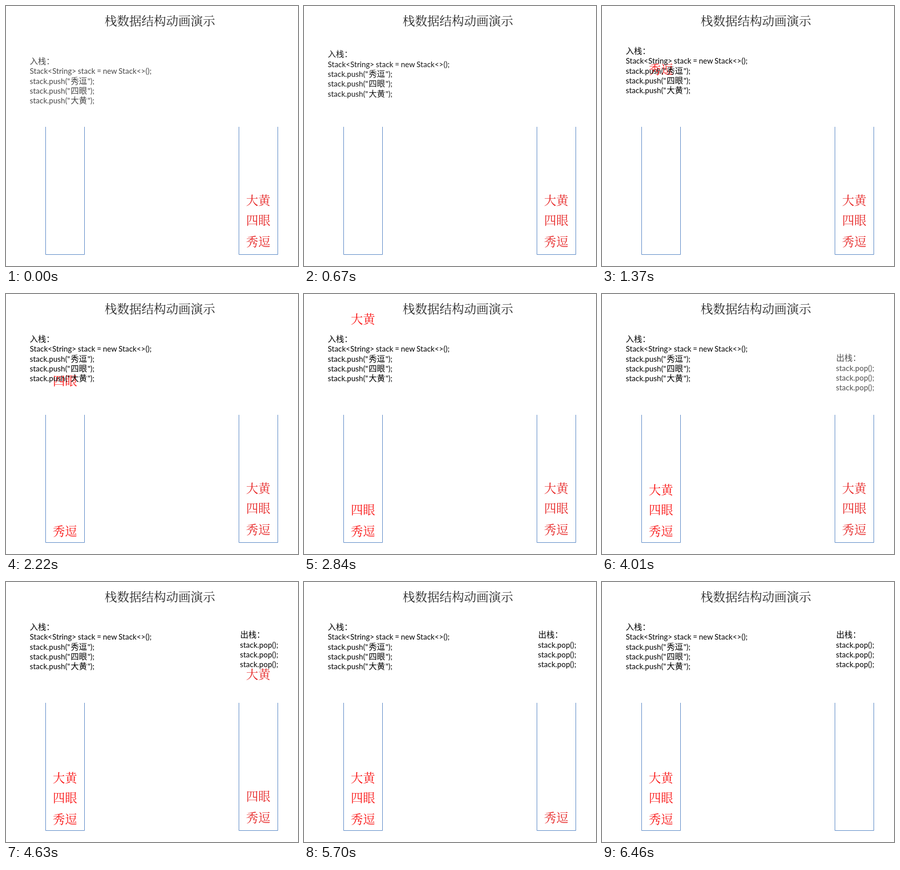
Write an HTML page that moves like this. It is 571x510 px and loops after 6.94 s.

```html
<!DOCTYPE html>
<html lang="zh-CN">
<head>
<meta charset="utf-8">
<style>
  html, body { margin: 0; width: 100%; height: 100%; overflow: hidden; background: #fff; }
  svg { display: block; }
  text { white-space: pre; }
  .big { font: 300 23.8px "Noto Serif CJK SC", "Noto Sans CJK SC", "Noto Sans CJK", serif; }
  .code { font: 14.8px Lato, "Noto Sans CJK SC", "Noto Sans CJK", sans-serif; letter-spacing: .08px; word-spacing: -.8px; }
  .cjk { font: 300 16px "Noto Sans CJK SC", "Noto Sans CJK", sans-serif; letter-spacing: 0; }
</style>
</head>
<body>
<svg id="stage" width="571" height="510" viewBox="0 0 571 510">
  <text class="big" x="193" y="38" fill="#262626" style="font-size:24px">栈数据结构动画演示</text>
  <path d="M77.5 237V487.5H153.5V237M455.5 237V487.5H531.5V237" fill="none" stroke="#5585c4"/>
  <g id="items"></g>
  <g id="push" class="code">
    <text class="cjk" x="46.5" y="94">入栈：</text>
    <text x="46.5" y="113.3">Stack&lt;String&gt; stack = new Stack&lt;&gt;();</text>
  </g>
  <g id="pop" class="code">
    <text class="cjk" x="458" y="109">出栈：</text>
  </g>
</svg>
<script>
const LOOP = 6940, TICK = 76.9, FLIGHT = 620, OFFSCREEN = -20;
const $ = id => document.getElementById(id);

function addText(parent, x, y, html, attrs = {}) {
  const el = document.createElementNS("http://www.w3.org/2000/svg", "text");
  for (const [key, value] of Object.entries({ x, y, ...attrs })) el.setAttribute(key, value);
  el.innerHTML = html;
  parent.append(el);
  return el;
}

// Centre heights in each stack, then the start of the push and of the pop
const items = [
  { name: "秀逗", left: 465, right: 461.5, pushAt: 1200, popAt: 5814 },
  { name: "四眼", left: 423, right: 420, pushAt: 1964, popAt: 5078 },
  { name: "大黄", left: 384, right: 381, pushAt: 2740, popAt: 4305 }
];
items.forEach((item, i) => {
  const y = 132.5 + 19.4 * i;
  addText($("push"), 46.5, y, `stack.push("<tspan class="cjk" x="126.5">${item.name}</tspan><tspan x="159.5">");</tspan>`);
  addText($("pop"), 457.5, y - 4, "stack.pop();");
  item.pushed = addText($("items"), 91.5, 0, item.name, { class: "big", fill: "#fa1414" });
  item.popped = addText($("items"), 469.5, 0, item.name, { class: "big", fill: "#e62222" });
});

const progress = (t, start, length) => Math.min(1, Math.max(0, (t - start) / length));
const mix = (a, b, p) => a + (b - a) * p;

function floatIn(group, p) {
  group.setAttribute("transform", `translate(0 ${72 * (1 - p)})`);
  group.setAttribute("opacity", p);
}

function draw(time) {
  const t = Math.floor((time % LOOP + 25) / TICK) * TICK;
  floatIn($("push"), mix(0.722, 1, progress(t, 0, 1020)));
  floatIn($("pop"), progress(t, 3330, 965));
  for (const { left, right, pushAt, popAt, pushed, popped } of items) {
    pushed.setAttribute("y", 9 + mix(OFFSCREEN, left, progress(t, pushAt, FLIGHT)));
    popped.setAttribute("y", 9 + mix(right, OFFSCREEN, progress(t, popAt, FLIGHT)));
  }
}

const begin = performance.now();
(function frame() {
  draw(performance.now() - begin);
  requestAnimationFrame(frame);
})();
</script>
</body>
</html>
```
